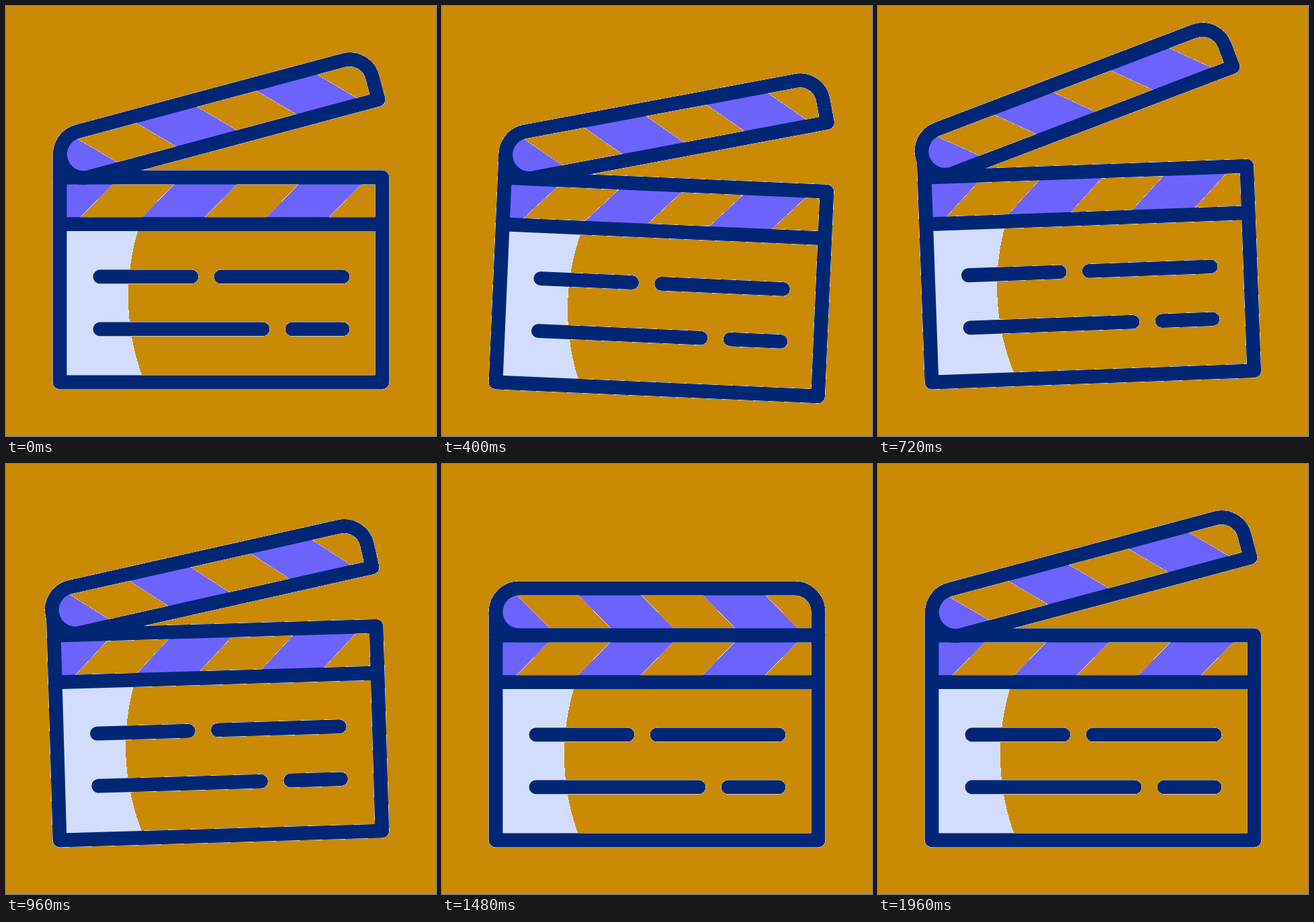
These frames come from a looping animation (640 px wide and 640 px high, 2 s). An HTML page with a canvas:

```html
<!DOCTYPE html>
<html lang="en">
<head>
<meta charset="utf-8">
<title>Clapperboard</title>
<style>
  html, body { margin: 0; width: 100%; height: 100%; overflow: hidden; background: #ca8a04; }
  canvas { display: block; width: 100vmin; height: 100vmin; }
</style>
</head>
<body>
<canvas id="stage" width="640" height="640"></canvas>
<script>
const ctx = document.getElementById('stage').getContext('2d', { willReadFrequently: true });
const SIZE = 640, LOOP = 2000, STEP = 40;
const NAVY = '#002776', PURPLE = '#6c63fc', PALE = '#d2ddfd';
const GOLD = [202, 138, 4];
const LINE = 20.84;
const MIN_ALPHA = 26;
const HINGE = { x: 115, y: 220 };

const smooth = u => u * u * (3 - 2 * u);
const glide = u => 1 - Math.pow(1 - u, 1.65);
const rad = deg => deg * Math.PI / 180;

// time, board angle, arm angle, arm shift x, arm shift y, easing into the key
const POSES = [
  [140, 0, -15, 0.4, 0.7],
  [275, 5, -10, 1.5, 1],
  [890, -3, -20, -3.4, -3.4, glide],
  [1040, 0, 0, 0, 0],
  [1160, 0, -4, -1.6, -3.7],
  [1325, 0, 0, 0, 0],
  [1805, 0, 0, 0, 0],
  [1960, 0, -15, 0.4, 0.7]
];
const JOLT = [[1040, 0], [1160, 1], [1470, 0]];

// left, right, y, drop when the arm lands
const BARS = [
  [140, 276, 402.8, 19.5],
  [320, 501, 402.8, 15],
  [140, 382, 480.9, 19.5],
  [426, 501, 480.9, 23]
];

function sample(keys, t) {
  const i = keys.findIndex(k => k[0] > t);
  if (i === 0) return keys[0].slice(1);
  if (i < 0) return keys[keys.length - 1].slice(1);
  const a = keys[i - 1], b = keys[i];
  const ease = b[5] || smooth;
  const e = ease((t - a[0]) / (b[0] - a[0]));
  return a.slice(1, 5).map((v, n) => v + (b[n + 1] - v) * e);
}

function poly(...pts) {
  const p = new Path2D();
  for (let i = 0; i < pts.length; i += 2) p.lineTo(pts[i], pts[i + 1]);
  p.closePath();
  return p;
}

function segment(x1, y1, x2, y2) {
  const p = new Path2D();
  p.moveTo(x1, y1);
  p.lineTo(x2, y2);
  return p;
}

const stripe = (x, top, bottom, lean) =>
  poly(x, top, x + 93, top, x + 93 + lean, bottom, x + lean, bottom);

const frame = new Path2D();
frame.rect(80, 255, 480, 305);
const divider = segment(80, 324.7, 560, 324.7);
const post = segment(80, 220, 80, 255);
const boardStripes = [
  poly(88, 260, 164, 260, 106, 319, 88, 319),
  stripe(256, 260, 319, -58),
  stripe(441, 260, 319, -58)
];

const shade = new Path2D();
shade.moveTo(82, 330);
shade.lineTo(197.3, 330);
shade.arc(526.5, 433, 345, Math.PI + Math.asin(103 / 345), Math.PI - Math.asin(122 / 345), true);
shade.lineTo(82, 555);
shade.closePath();

// Arm parts are placed relative to the hinge.
const arm = new Path2D();
arm.moveTo(445, 34.8);
arm.lineTo(0, 34.8);
arm.arc(0, 0, 35, Math.PI / 2, Math.PI * 1.5);
arm.lineTo(410, -35);
arm.arc(410, 0, 35, -Math.PI / 2, 0);
arm.closePath();

const armStripes = [stripe(83, -30, 29, 58), stripe(268, -30, 29, 58)];
const armTip = new Path2D();
armTip.arc(0, 0, 30, Math.PI / 2, Math.PI * 1.5);
armTip.lineTo(-9, -30);
armTip.lineTo(50, 29);
armTip.closePath();

function fill(path, color) {
  ctx.fillStyle = color;
  ctx.fill(path);
}

function line(path, cap = 'butt') {
  ctx.lineCap = cap;
  ctx.stroke(path);
}

function drawBoard(jolt) {
  fill(shade, PALE);
  boardStripes.forEach(p => fill(p, PURPLE));
  [frame, divider, post].forEach(p => line(p));
  for (const [x1, x2, y, drop] of BARS) {
    const at = y + drop * jolt;
    line(segment(x1, at, x2, at), 'round');
  }
}

function drawArm(angle, dx, dy) {
  ctx.translate(HINGE.x + dx, HINGE.y + dy);
  ctx.rotate(rad(angle));
  [armTip, ...armStripes].forEach(p => fill(p, PURPLE));
  line(arm);
}

// Soft edge pixels blend into white, giving the thin light rim on gold.
function flatten() {
  const img = ctx.getImageData(0, 0, SIZE, SIZE), d = img.data;
  for (let i = 0; i < d.length; i += 4) {
    const a = d[i + 3];
    if (a === 255) continue;
    for (let c = 0; c < 3; c++) {
      d[i + c] = a < MIN_ALPHA ? GOLD[c] : 255 + (d[i + c] - 255) * a / 255;
    }
    d[i + 3] = 255;
  }
  ctx.putImageData(img, 0, 0);
}

function draw(t) {
  const [tilt, angle, dx, dy] = sample(POSES, t);
  const [jolt] = sample(JOLT, t);
  ctx.clearRect(0, 0, SIZE, SIZE);
  ctx.save();
  ctx.lineJoin = 'round';
  ctx.lineWidth = LINE;
  ctx.strokeStyle = NAVY;
  ctx.translate(80, 560);
  ctx.rotate(rad(tilt));
  ctx.translate(-80, -560);
  drawBoard(jolt);
  drawArm(angle, dx, dy);
  ctx.restore();
  flatten();
}

const start = performance.now();
let shown = -1;
function tick() {
  const t = (performance.now() - start) % LOOP;
  const now = Math.floor(t / STEP) * STEP;
  if (now !== shown) draw(shown = now);
  requestAnimationFrame(tick);
}
tick();
</script>
</body>
</html>
```
